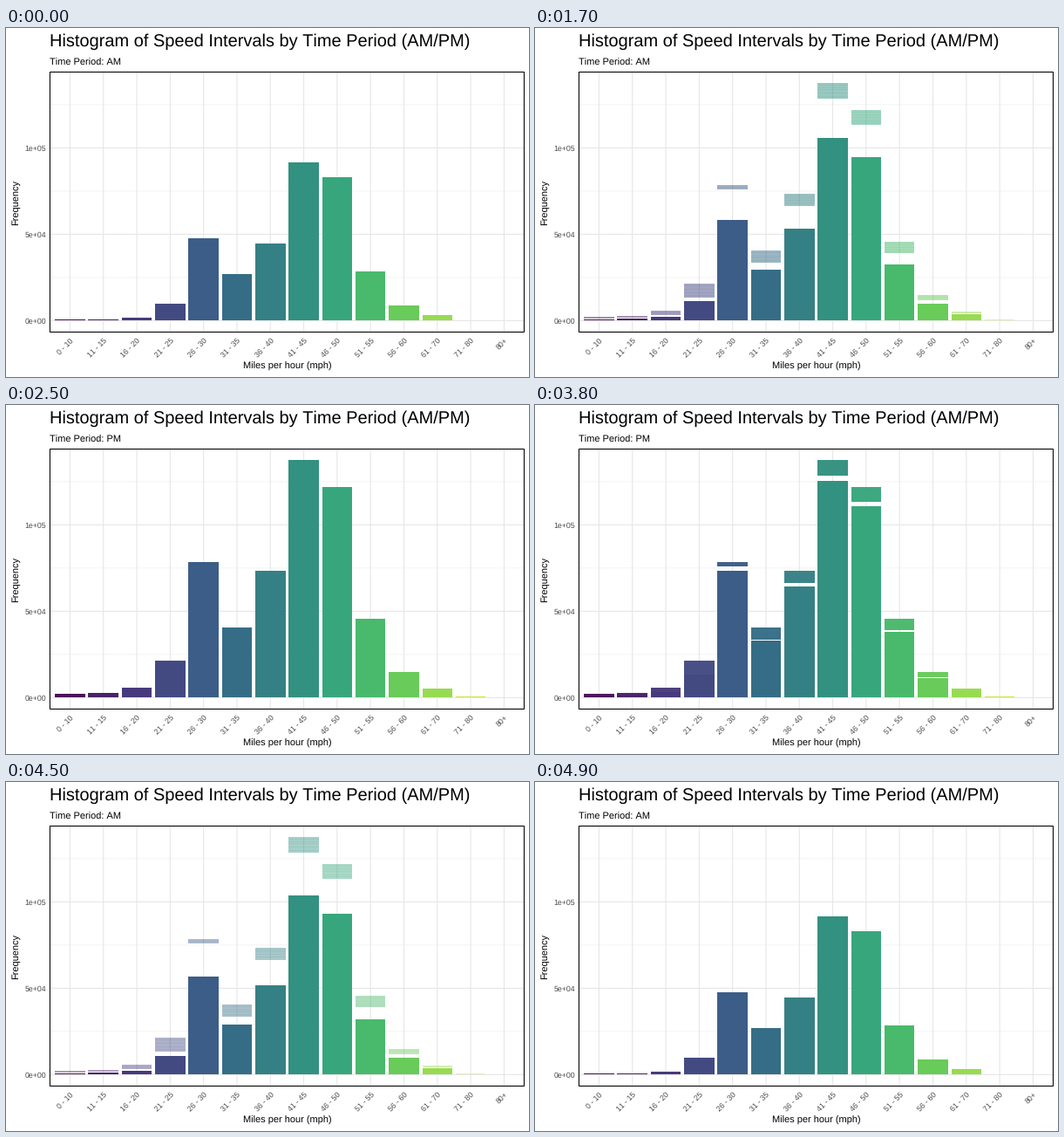
Write a matplotlib script that moves like this. It is 600 px wide and 400 px high and loops after 5000 ms.

```python
import numpy as np
import matplotlib.pyplot as plt
from matplotlib.animation import FuncAnimation
from matplotlib.patches import Rectangle

plt.rcParams["font.family"] = "Liberation Sans"
plt.rcParams["text.hinting"] = "none"
plt.rcParams["text.kerning_factor"] = 6     # plain advance widths

W, H, DPI = 600, 400, 100
PT = 72 / DPI                      # points per pixel
FRAMES, INTERVAL = 50, 100
LEFT, RIGHT, TOP, BOTTOM = 50.43, 594.42, 50.5, 348.5
STEP = (RIGHT - LEFT) / 14.2
BASE, UNIT = 335.4, 99.0           # y of zero, pixels per 50 000
BAR_W = 0.9 * STEP

LABELS = ["0 - 10", "11 - 15", "16 - 20", "21 - 25", "26 - 30", "31 - 35",
          "36 - 40", "41 - 45", "46 - 50", "51 - 55", "56 - 60", "61 - 70",
          "71 - 80", "80+"]
COLORS = ["#4a1259", "#4a2268", "#463a7c", "#434a82", "#3c5d87", "#356d86",
          "#358085", "#329180", "#38a67d", "#49b96b", "#68cb5a", "#97db50",
          "#cbe34a"]
# Bar tops in pixels: morning, evening without the extra part, evening total
AM = np.array([334, 333.6, 331.8, 316, 241.4, 282, 247, 154.3, 171.4, 279,
               318, 329, 335.3])
PM = np.array([333, 332.2, 328.7, 308.7, 184.8, 268.8, 204, 81.4, 110.8, 258,
               312.3, 327, 335.2])
TOTAL = np.array([331.3, 329.6, 324.4, 293, 179.7, 254.8, 189.8, 63, 93.8,
                  244.7, 305.7, 325.4, 334])

fig = plt.figure(figsize=(W / DPI, H / DPI), dpi=DPI, facecolor="white")
ax = fig.add_axes([0, 0, 1, 1])
ax.set_xlim(0, W)
ax.set_ylim(H, 0)
ax.axis("off")


def center(i):
    return LEFT + (0.6 + i) * STEP


def line(x, y, color, width):
    ax.plot(x, y, color=color, lw=width * PT, zorder=1, snap=False,
            solid_capstyle="butt")


def text(x, y, s, size, color="black", **kw):
    kw = {"ha": "left", "va": "baseline", **kw}
    return ax.text(x, y, s, fontsize=size * PT, color=color,
                   rotation_mode="anchor", **kw)


def set_span(patch, top, bottom):
    """Place a bar between two heights on whole pixels."""
    top, bottom = round(top), round(bottom)
    patch.set_y(top)
    patch.set_height(bottom - top)


def bar(i, top, bottom, z, alpha=1.0):
    x0 = round(center(i) - BAR_W / 2)
    x1 = round(center(i) + BAR_W / 2)
    patch = Rectangle((x0, 0), x1 - x0, 0, lw=0, facecolor=COLORS[i],
                      alpha=alpha, zorder=z, snap=False)
    set_span(patch, top, bottom)
    return ax.add_patch(patch)


# Grid and labels
for k in (0.5, 1.5, 2.5):
    y = BASE - k * UNIT
    line([LEFT, RIGHT], [y, y], "#ebebeb", 0.53)
for k, s in enumerate(["0e+00", "5e+04", "1e+05"]):
    y = BASE - k * UNIT
    line([LEFT, RIGHT], [y, y], "#e6e6e6", 1.07)
    text(46, y + 3.2, s, 8.8, "#4d4d4d", ha="right")
for i, s in enumerate(LABELS):
    x = center(i)
    line([x, x], [TOP, BOTTOM], "#e6e6e6", 1.07)
    text(x + 4.6, 358.6, s, 8.8, "#4d4d4d", ha="right", rotation=45)

ax.add_patch(Rectangle((LEFT, TOP), RIGHT - LEFT, BOTTOM - TOP, fill=False,
                       ec="black", lw=1.07 * PT, zorder=5, snap=False))
text(50.3, 21, "Histogram of Speed Intervals by Time Period (AM/PM)", 20)
subtitle = text(50.3, 43, "", 11)
text((LEFT + RIGHT) / 2, 391, "Miles per hour (mph)", 11, ha="center")
text(13.4, (TOP + BOTTOM) / 2, "Frequency", 11, ha="center", rotation=90)

# Growing bars, fading parts above them, and faint layers in those parts
rng = np.random.default_rng(4)
bars, extras, layers = [], [], []
for i in range(len(COLORS)):
    bars.append(bar(i, AM[i], BASE, 2))
    extras.append(bar(i, TOTAL[i], PM[i], 3, 0))
    y = round(TOTAL[i]) + 2
    while y < PM[i] - 1.5:
        layers.append(bar(i, y, y + 1, 4, 0))
        y += int(rng.integers(2, 5))


def progress(n):
    if n <= 25:
        return min(max((n - 12) / 13, 0), 1)
    return 1 - min(max((n - 37) / 12, 0), 1)


def update(n):
    t = progress(n)
    subtitle.set_text("Time Period: " + ("PM" if t >= 0.5 else "AM"))
    for b, y in zip(bars, AM + (PM - AM) * t):
        set_span(b, y, BASE)
    fade = 1 - (1 - t) ** 1.4
    for e in extras:
        e.set_alpha(fade)
    for s in layers:
        s.set_alpha(0.35 * fade * (1 - fade))
    return [subtitle, *bars, *extras, *layers]


anim = FuncAnimation(fig, update, frames=FRAMES, interval=INTERVAL,
                     repeat=True, repeat_delay=0, blit=False)
plt.show()
```
